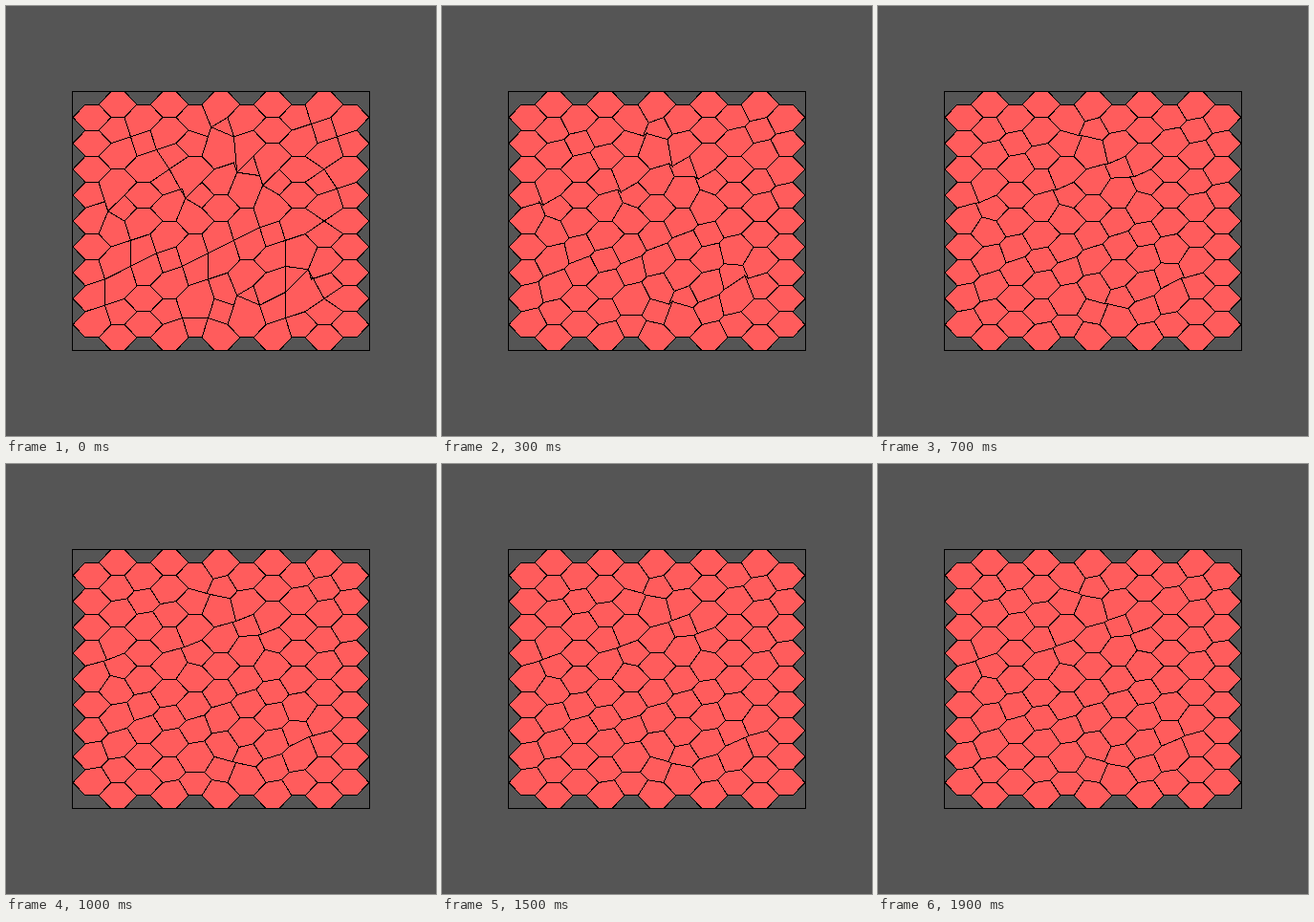
Recreate the animation shown at these times as an HTML page. Size 450 by 450 pixels, loop 2 s.

```html
<!DOCTYPE html>
<html>
<head>
<meta charset="utf-8">
<title>Relaxing cells</title>
<style>
html, body { margin: 0; height: 100%; overflow: hidden; background: #555; }
svg { display: block; width: 450px; height: 450px; }
</style>
</head>
<body>
<svg viewBox="0 0 450 450" stroke="#000" shape-rendering="crispEdges">
  <rect x="69.5" y="89.5" width="311" height="271" fill="none"/>
  <path id="cells" fill="#ff5c5c"/>
</svg>
<script>
const COLUMNS = 11, LEVELS = 20;
const mix = (a, b, f) => [a[0] + (b[0] - a[0]) * f, a[1] + (b[1] - a[1]) * f];

// Vertices form zigzags: seam g lies to the right of column g.
const seams = [];
for (let g = -1; g < COLUMNS; g++) {
  const seam = [];
  for (let k = 0; k <= LEVELS; k++) {
    const rest = [((g + k) & 1 ? 97 : 110) + 27 * g, 89.5 + 13.55 * k];
    seam.push({ rest, start: rest, end: rest, power: 1 });
  }
  seams.push(seam);
}
const vertex = (g, k) => seams[g + 1][k];

function pinch(v, point, residue, power = 1) {
  v.start = point;
  v.end = mix(v.rest, point, residue);
  v.power = power;
}

function pinchPair(a, b, residue, power) {
  const middle = mix(a.rest, b.rest, 0.5);
  pinch(a, middle, residue, power);
  pinch(b, middle, residue, power);
  return middle;
}

// Slanted edges shrunk to a point, listed per seam by upper vertex.
const slanted = [[14, 16], [3, 11, 13], [4, 12], [13, 17], [12, 14, 17],
  [3, 11], [10, 16], [11, 13, 15, 17], [2], [3, 7]];
slanted.forEach((list, g) => list.forEach(k =>
  pinchPair(vertex(g, k), vertex(g, k + 1), 0.28)));

// Two neighbouring edges shrunk in turn: seam, first vertex, direction.
const doubles = [[0, 8, 1], [3, 7, 1], [4, 4, -1], [5, 5, 1],
  [5, 17, -1], [6, 6, 1], [8, 15, -1]];
for (const [g, k, dir] of doubles) {
  const a = vertex(g, k), b = vertex(g, k + dir), c = vertex(g, k + 2 * dir);
  const middle = pinchPair(a, b, 0.72);
  const far = mix(middle, c.rest, 0.5);
  a.start = far;
  pinch(c, far, 0.2);
}

// Level edges shrunk to a point: column, level. These reopen quickly.
for (const [c, k] of [[3, 6], [9, 6], [9, 10], [9, 16]])
  pinchPair(vertex(c - 1, k), vertex(c, k), 0, 3);

const path = document.getElementById('cells');

function draw(t) {
  const strain = 1 / (1 + 4 * t);
  const at = (g, k) => {
    const v = vertex(g, k);
    return mix(v.end, v.start, strain ** v.power).map(n => n.toFixed(2)).join();
  };
  let d = '';
  for (let c = 0; c < COLUMNS; c++)
    for (let k = c % 2 ? 0 : 1; k + 2 <= LEVELS; k += 2)
      d += 'M' + [at(c - 1, k), at(c, k), at(c, k + 1), at(c, k + 2),
        at(c - 1, k + 2), at(c - 1, k + 1)].join('L') + 'Z';
  path.setAttribute('d', d);
}

function tick() {
  draw(Math.floor(performance.now() % 2000 / 100) / 10);
  requestAnimationFrame(tick);
}
tick();
</script>
</body>
</html>
```
